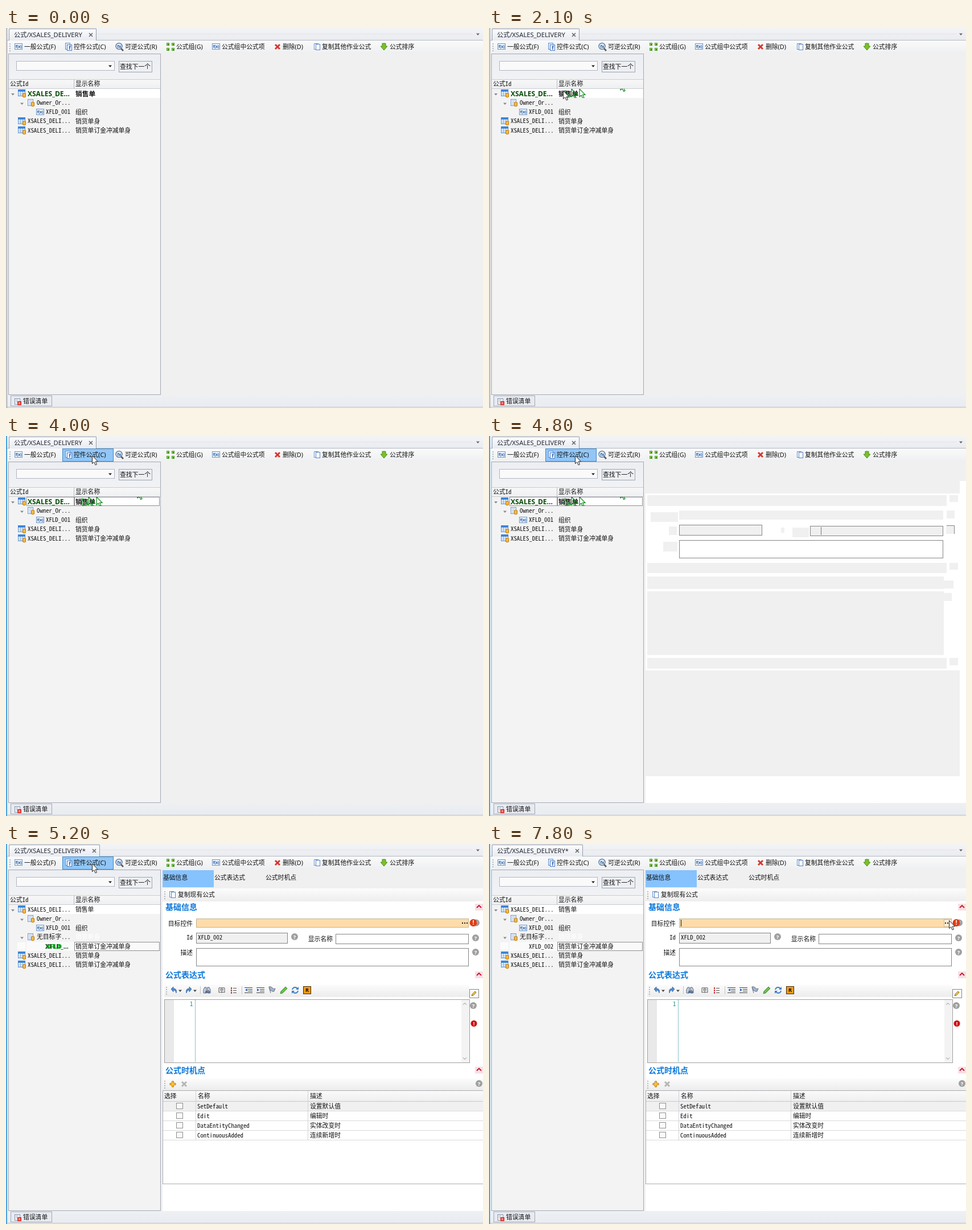
Recreate the animation shown at these times as an HTML page with a canvas. Size 838 px wide and 668 px high, loop 8000 ms.

```html
<!DOCTYPE html>
<html lang="zh-CN">
<head>
<meta charset="utf-8">
<title>公式</title>
<style>
html, body { margin: 0; width: 100%; height: 100%; overflow: hidden; background: #f0f0f0; }
canvas { display: block; }
</style>
</head>
<body>
<canvas id="stage" width="838" height="668"></canvas>
<script>
const ctx = document.getElementById('stage').getContext('2d');
const LOOP = 8000;
const SANS = '"Noto Sans", "Open Sans", "Noto Sans CJK SC", "Noto Sans CJK", sans-serif';
const MONO = '"Noto Sans Mono CJK SC", "Noto Sans Mono", "Noto Sans CJK SC", monospace';
const SIZE = 10.8;
const GRAY = '#f0f0f0', HEAD = '#0a78dc';

// Half-width letters should be half as wide as an ideograph.
ctx.font = `${SIZE}px ${MONO}`;
const MONO_SIZE = SIZE * (SIZE / 2) / ctx.measureText('X').width;

function rect(x, y, w, h, fill, stroke) {
  if (fill) { ctx.fillStyle = fill; ctx.fillRect(x, y, w, h); }
  if (stroke) { ctx.strokeStyle = stroke; ctx.lineWidth = 1; ctx.strokeRect(x + .5, y + .5, w - 1, h - 1); }
}
function fade(x, y, w, h, top, bottom) {
  const g = ctx.createLinearGradient(0, y, 0, y + h);
  g.addColorStop(0, top);
  g.addColorStop(1, bottom);
  rect(x, y, w, h, g);
}
function text(s, x, y, { color = '#111', size = SIZE, weight = 400, font = SANS, align = 'left' } = {}) {
  ctx.font = `${weight} ${size}px ${font}`;
  ctx.fillStyle = color;
  ctx.textAlign = align;
  ctx.textBaseline = 'alphabetic';
  ctx.fillText(s, x, Math.round(y + size * .37));
}
const mono = (s, x, y, o) => text(s, x, y, { font: MONO, size: MONO_SIZE, ...o });
function path(d, x, y, stroke, width = 1, fill) {
  const p = new Path2D(d);
  ctx.save();
  ctx.translate(x, y);
  if (fill) { ctx.fillStyle = fill; ctx.fill(p); }
  if (stroke) { ctx.strokeStyle = stroke; ctx.lineWidth = width; ctx.stroke(p); }
  ctx.restore();
}
function disc(x, y, r, fill, mark) {
  ctx.beginPath();
  ctx.arc(x, y, r, 0, 7);
  ctx.fillStyle = fill;
  ctx.fill();
  if (mark) text(mark, x, y, { color: '#fff', size: r * 1.6, weight: 700, align: 'center' });
}
const help = (x, y) => disc(x, y, 6, '#a0a0a0', '?');
const alarm = (x, y) => disc(x, y, 5.5, '#d01010', '!');
const down = (x, y, color = '#444') => path('M-3 -1.5H3L0 2Z', x, y, null, 1, color);
function grip(x, y, n) {
  for (let i = 0; i < n; i++) rect(x, y + i * 4, 2, 2, '#b4b8be');
}
function dotted(x, y, w, h) {
  ctx.setLineDash([1, 1]);
  rect(x, y, w, h, null, '#222');
  ctx.setLineDash([]);
}

const icons = {
  fx(x, y) {
    rect(x - 7, y - 6, 14, 11, '#eaf4ff', '#6d93c4');
    text('f(x)', x, y - .5, { size: 6.5, weight: 700, color: '#24508c', align: 'center' });
  },
  pages(x, y) {
    rect(x - 6, y - 7, 9, 12, '#e2efff', '#5f8fd0');
    rect(x - 3, y - 4, 9, 11, '#f8fbff', '#4c7cc2');
  },
  control(x, y) {
    icons.pages(x, y);
    text('f', x + 2, y + 1.5, { size: 9, weight: 700, color: '#2459a8', align: 'center' });
  },
  lens(x, y) {
    path('M3 3L7 7', x, y, '#555', 2.5);
    path('M5 -1A5.5 5.5 0 1 1 -6 -1A5.5 5.5 0 1 1 5 -1', x, y, '#6680a0', 1.5, '#dcecff');
    text('fx', x, y - 1, { size: 7, weight: 700, color: '#24508c', align: 'center' });
  },
  group(x, y) {
    for (const dx of [-7, 2]) for (const dy of [-7, 2]) {
      rect(x + dx, y + dy, 5, 5, '#a5d86c', '#4b9c25');
      rect(x + dx + 2, y + dy + 2, 2, 2, '#3d8a18');
    }
  },
  cross: (x, y) => path('M-4 -4L4 4M4 -4L-4 4', x, y, '#d5382f', 3),
  copy(x, y) {
    rect(x - 5, y - 6, 8, 11, '#f4f8ff', '#6a93cf');
    rect(x - 2, y - 5, 8, 11, '#fff', '#5b85c4');
  },
  sort: (x, y) => path('M-3 -6H3V-1H6L0 6L-6 -1H-3Z', x, y, '#4b8f16', 1, '#7ac02c'),
  drum(x, y) {
    path('M-2.5 -3Q0 -4.5 2.5 -3V3Q0 4.5 -2.5 3Z', x, y, '#b97812', 1, '#f7b93e');
  },
  table(x, y) {
    rect(x - 7, y - 7, 13, 12, '#f4f9ff', '#5b8fd0');
    rect(x - 7, y - 7, 13, 4, '#3d86d8');
    path('M-7 -.5H6M-7 2.5H6M-2.5 -3V5M1.5 -3V5', x, y, '#8db4e2');
    icons.drum(x + 4, y + 3);
  },
  field(x, y) {
    rect(x - 6, y - 7, 10, 12, '#f6faff', '#6f95c8');
    path('M-4 -4H2M-4 -1H1M-4 2H0', x, y, '#8aa9d4');
    icons.drum(x + 3, y + 2);
  }
};

const TOOLS = [
  ['fx', 22, 32, '一般公式(F)'], ['control', 110, 119, '控件公式(C)'], ['lens', 199, 209, '可逆公式(R)'],
  ['group', 289, 299, '公式组(G)'], ['fx', 369, 379, '公式组中公式项'], ['cross', 477, 486, '删除(D)'],
  ['copy', 546, 555, '复制其他作业公式'], ['sort', 664, 674, '公式排序']
];

function drawFrame(t) {
  const edited = t >= 4900, tabRight = edited ? 165 : 159;
  rect(0, 0, 838, 668, GRAY);
  fade(0, 0, 838, 22, '#f3f4f6', '#e9ebef');
  rect(160, 10, 660, 1, '#e2e4e8');
  rect(0, 21, 838, 1, '#b3b9c4');
  fade(5, 1, tabRight - 5, 21, '#fcfcfd', '#e8ebf1');
  path(`M5.5 22V1.5H${tabRight - .5}V22`, 0, 0, '#949cab');
  text('公式/XSALES_DELIVERY' + (edited ? '*' : ''), 14, 12, { size: 11.2, color: '#202530' });
  path('M-3 -3L3 3M3 -3L-3 3', tabRight - 10, 12, '#666', 1.6);
  down(829, 11, '#666');

  fade(3, 22, 835, 23, '#fafafa', '#eeeff1');
  grip(6, 27, 4);
  if (t >= 4000 && t < 6700) rect(99, 22, 90, 23, t >= 4700 && t < 4800 ? '#78b5ee' : '#91c6f7', '#3f87c8');
  for (const [icon, ix, tx, label] of TOOLS) {
    icons[icon](ix, 33);
    text(label, tx, 33.5);
  }

  rect(4, 45, 268, 600, '#f3f3f4', '#a4a9b3');
  fade(5, 46, 266, 44, '#eceef2', '#f1f2f4');
  rect(18, 58, 173, 17, '#fafafb', '#b1b6c0');
  down(183, 67, '#222');
  rect(198, 58, 59, 20, '#edeff3', '#9ba3b2');
  text('查找下一个', 200, 68.5);
  fade(5, 90, 266, 17, '#f8f8f9', '#eeeff1');
  rect(5, 90, 266, 1, '#c9ccd2');
  rect(5, 106, 266, 1, '#c9ccd2');
  rect(119, 90, 1, 17, '#b9bdc5');
  mono('公式Id', 7, 98);
  text('显示名称', 122, 98);

  fade(2, 645, 836, 23, '#eef0f3', '#e8ebef');
  rect(8, 646, 73, 19, '#e7eaf0', '#a1a8b5');
  rect(15, 651, 10, 11, '#fff', '#8390a5');
  path('M17 654H22M17 657H22', 0, 0, '#8390a5');
  rect(20, 656, 7, 7, '#d33');
  path('M22 658L25 661M25 658L22 661', 0, 0, '#fff');
  text('错误清单', 30, 656.5);
  rect(2, 666, 836, 1, '#bfc4cc');
  rect(0, 0, 2, 668, t >= 2400 ? '#4ba3df' : '#e7e8ea');
  if (t < 2400) rect(1, 0, 1, 668, '#8d9197');
}

function treeRow(y, depth, icon, id, name, open) {
  const x = 38 + depth * 16;
  if (open) down(x - 26, y + 1.5, '#888');
  if (icon) icons[icon](x - 10, Math.round(y));
  if (id) mono(id, x, y);
  if (name) text(name, 122, y + .5);
}

function drawTree(t) {
  rect(36, 107, 235, 16, '#fff');
  treeRow(131.5, 1, 'field', 'Owner_Or...', '', true);
  treeRow(147.5, 2, 'fx', 'XFLD_001', '组织');
  if (t < 4900) {
    treeRow(115, 0, 'table', '', '', true);
    text('XSALES_DE...', 38, 115.5, { weight: 700, size: 12, color: '#064d06' });
    text('销售单', 122, 115.5, { weight: 700, size: 11.7 });
    treeRow(163.5, 0, 'table', 'XSALES_DELI...', '销货单身');
    treeRow(180, 0, 'table', 'XSALES_DELI...', '销货单订金冲减单身');
    drawTrails(t);
    if (t >= 2400) {
      dotted(36, 107, 84, 16);
      dotted(120, 107, 150, 16);
    }
    return;
  }
  treeRow(115, 0, 'table', 'XSALES_DELI...', '销售单', true);
  text('销货单身', 122, 163.5, { color: '#fff' });
  treeRow(163.5, 1, 'field', '无目标字...', '', true);
  rect(20, 173, 14, 13, '#fbfbfb');
  rect(36, 172, 234, 16, '#fafafa');
  treeRow(180, 2, '', t >= 7800 ? 'XFLD_002' : '', '销货单订金冲减单身');
  if (t < 7800) {
    text('XFLD_...', 69, 180.5, { weight: 700, color: '#0a3a0a' });
    text('XFLD', 71, 180.5, { weight: 700, color: '#00b818' });
  }
  dotted(120, 172, 150, 16);
  treeRow(196, 0, 'table', 'XSALES_DELI...', '销货单身');
  treeRow(212, 0, 'table', 'XSALES_DELI...', '销货单订金冲减单身');
}

const ARROW = 'M0 0V14L3.2 11.2L5.6 16.5L8 15.4L5.6 10.4H10Z';
// Time, x, y of the pointer tip.
const ROUTE = [
  [1000, 800, 22], [1300, 433, 66], [1500, 231, 95], [1600, 192, 104], [1700, 160, 107], [1800, 144, 107],
  [2200, 125, 111], [3700, 125, 111], [3800, 131, 94], [3900, 145, 52], [4000, 151, 34], [6500, 151, 34],
  [6700, 240, 46], [7000, 520, 88], [7200, 712, 118], [7300, 780, 131], [7400, 808, 134]
];
function pointerAt(t) {
  const now = Math.floor(t / 100) * 100;
  const next = ROUTE.findIndex(k => k[0] > now);
  if (next < 0) return ROUTE[ROUTE.length - 1].slice(1);
  const [t0, x0, y0] = ROUTE[next - 1], [t1, x1, y1] = ROUTE[next];
  const k = (now - t0) / (t1 - t0);
  return [x0 + (x1 - x0) * k, y0 + (y1 - y0) * k];
}
function drawTrails(t) {
  ctx.save();
  ctx.beginPath();
  ctx.rect(121, 107, 149, 16);
  ctx.clip();
  for (const [when, x, y] of [[1600, 231, 95], [1800, 159, 107], [1900, 145, 107], [2100, 134, 110]])
    if (t >= when) path(ARROW, x, y, '#078a16', 1.2, x > 150 ? '#fff' : null);
  ctx.restore();
}

// Blocks shown while the form is being built: x, y, width, height.
const BLOCKS = [
  [278, 104, 526, 19], [809, 104, 15, 12], [278, 223, 526, 18], [809, 223, 15, 12],
  [278, 247, 521, 22], [799, 254, 17, 14], [278, 273, 521, 112], [799, 276, 14, 14],
  [278, 390, 526, 19], [809, 390, 15, 13], [275, 412, 552, 186], [316, 159, 14, 15],
  [513, 161, 6, 9], [803, 157, 15, 15]
];
function drawWaiting() {
  rect(284, 134, 48, 17, GRAY);
  rect(334, 131, 464, 16, GRAY);
  rect(804, 131, 14, 14, GRAY);
  rect(533, 161, 29, 17, GRAY);
  rect(306, 186, 25, 17, GRAY);
}
function drawSkeleton(t) {
  for (const b of BLOCKS) rect(...b, GRAY);
  drawWaiting();
  if (t < 4800) return;
  rect(334, 156, 146, 19, GRAY, '#858585');
  rect(564, 158, 234, 18, GRAY, '#858585');
  rect(583, 160, 1, 14, '#777');
  path('M804 157.5H817.5V172', 0, 0, '#858585');
  rect(334, 183, 464, 32, '#fff', '#858585');
}

function section(label, y) {
  text(label, 280, y, { size: 14, weight: 700, color: HEAD });
  rect(824, y - 6, 14, 12, '#f8dfe2');
  path('M-4 2L0 -2L4 2', 831, y - 1, '#c8102e', 1.8);
}

function drawEditorBar() {
  fade(278, 247, 536, 22, '#fcfcfc', '#ececec');
  grip(281, 251, 4);
  path('M-5 -2L-1 -6V-3Q6 -3 4 5Q3 0 -1 0V3Z', 295, 257, '#3568a5', .8, '#4d8bd4');
  path('M5 -2L1 -6V-3Q-6 -3 -4 5Q-3 0 1 0V3Z', 321, 257, '#3568a5', .8, '#4d8bd4');
  down(306, 258); down(332, 258);
  rect(341, 250, 1, 14, '#c4c4c4');
  path('M-6 5V-1L-4 -5H-1V5ZM1 5V-5H4L6 -1V5Z', 353, 257, '#58667a', 1, '#c6d0df');
  text('ab', 354, 259, { size: 7, weight: 700, align: 'center', color: '#244a80' });
  path('M0 -4Q-3 -5 -5 -4V4Q-3 3 0 4Q3 3 5 4V-4Q3 -5 0 -4V4M-3 -2H-1M-3 0H-1M1 -2H3M1 0H3', 379, 257, '#555');
  for (let i = 0; i < 3; i++) {
    rect(395, 252 + i * 4, 2, 3, '#c33');
    rect(399, 253 + i * 4, 6, 1, '#555');
  }
  rect(414, 250, 1, 14, '#c4c4c4');
  for (const [x, dir] of [[426, -1], [447, 1]]) {
    path('M-7 -5H7M-1 -2H7M-1 1H7M-7 4H7', x, 257.5, '#444');
    path(`M${-4 - 2 * dir} -3L${-4 + 2 * dir} -.5L${-4 - 2 * dir} 2Z`, x, 257, null, 1, '#2868c0');
  }
  path('M-5 -6L-2 5M-5 -6Q-1 -7 1 -4T6 -3L4 2Q1 3 -1 1T-3 1Z', 467, 257, '#66748a', 1, '#a3b3c9');
  path('M-6 6L-5 2L3 -6L6 -3L-2 5Z', 488, 257, '#3c8f2d', 1, '#6bc04e');
  path('M-5 -1Q-4 -5 0 -5Q3 -5 4 -2M5 1Q4 5 0 5Q-3 5 -4 2', 508, 257, '#3b7fc9', 2);
  path('M6 -6V-1H1ZM-6 6V1H-1Z', 508, 257, null, 1, '#3b7fc9');
  rect(522, 250, 14, 14, '#f59a16', '#3b2a08');
  text('R', 529, 257, { size: 9, weight: 700, align: 'center' });
}

function drawEditor(t) {
  section('公式表达式', 230);
  drawEditorBar();
  rect(278, 273, 537, 112, '#fff', '#a0a0a0');
  rect(279, 274, 16, 110, '#e9e9e9');
  mono('1', 323, 281, { color: '#168c8c' });
  ctx.setLineDash([1, 1]);
  path('M332.5 274V384', 0, 0, '#168c8c');
  ctx.setLineDash([]);
  rect(800, 274, 14, 110, '#f3f3f3');
  path('M-3 1.5L0 -1.5L3 1.5', 806, 281, '#888');
  path('M-3 -1.5L0 1.5L3 -1.5', 806, 377, '#888');
  rect(814, 255, 17, 16, '#fafafa', '#888');
  path('M-4 4L-3 1L2 -4L4 -2L-1 3Z', 822, 263, '#8a6a18', 1, '#f2c84b');
  help(821, 284);
  const hidden = [[5400, 5700], [5900, 6100], [6300, 6600]].some(([a, b]) => t >= a && t < b);
  if (!hidden) alarm(822, 315.5);
}

function drawTriggers() {
  section('公式时机点', 397.5);
  fade(275, 412, 563, 21, '#fcfcfc', '#ececec');
  grip(278, 416, 4);
  path('M-1.5 -5H1.5V-1.5H5V1.5H1.5V5H-1.5V1.5H-5V-1.5H-1.5Z', 293, 422, '#b97a10', 1, '#ffc83d');
  path('M-4 -4L4 4M4 -4L-4 4', 313, 422, '#b5b5b5', 3);
  help(831, 421);
  rect(275, 433, 570, 165, '#fff', '#a7abb2');
  fade(276, 434, 562, 18, '#fafafa', '#eeeff0');
  rect(276, 452, 562, 17, '#f0f0f1');
  for (const [label, x] of [['选择', 278], ['名称', 337], ['描述', 534]]) text(label, x, 443);
  const rows = [['SetDefault', '设置默认值'], ['Edit', '编辑时'], ['DataEntityChanged', '实体改变时'], ['ContinuousAdded', '连续新增时']];
  rect(276, 452, 562, 1, '#c6c9ce');
  rows.forEach(([name, note], i) => {
    const y = 461 + i * 17;
    rect(276, y + 8, 562, 1, '#dadada');
    rect(299, y - 6, 12, 11, '#fafafa', '#8e8e8e');
    mono(name, 336, y);
    text(note, 534, y + .5);
  });
  rect(333, 434, 1, 87, '#d0d2d6');
  rect(530, 434, 1, 87, '#d0d2d6');
}

function drawBasics(t) {
  section('基础信息', 111);
  rect(334, 156, 161, 19, GRAY, '#858585');
  mono('XFLD_002', 337, 164);
  help(507, 163);
  rect(579, 158, 234, 18, '#fff', '#858585');
  rect(334, 183, 479, 32, '#fff', '#858585');
  if (t < 5000) {
    drawWaiting();
    rect(316, 159, 14, 15, GRAY);
    rect(804, 131, 8, 14, GRAY);
    path('M564.5 161V175.5H577M583.5 160V174M797.5 159V175', 0, 0, '#858585');
    return;
  }
  rect(275, 46, 563, 31, GRAY);
  rect(275, 46, 90, 30, '#86c2fd');
  for (const [label, x] of [['基础信息', 276], ['公式表达式', 366], ['公式时机点', 456]]) text(label, x, 59.5);
  fade(275, 78, 563, 22, '#fcfcfc', '#eeeeee');
  grip(278, 83, 4);
  icons.copy(292, 89);
  text('复制现有公式', 302, 89.5);
  text('目标控件', 328, 140, { align: 'right' });
  mono('Id', 328, 164, { align: 'right' });
  text('显示名称', 574, 167, { align: 'right' });
  text('描述', 328, 191.5, { align: 'right' });
  help(825, 165);
  help(825, 190);
  help(826, 138.5);
  rect(334, 131, 479, 16, t < 5100 ? GRAY : '#fedcaa', '#c5b28f');
  if (t < 5100) return;
  if (t >= 7500) rect(799, 132, 14, 14, '#fdeed7', '#d3b98c');
  for (const x of [801, 805, 809]) rect(x, 138, 2, 2, '#222');
  if (t >= 7800) rect(337, 133, 1, 12, '#111');
  if (t >= 5200) disc(821, 138.5, 6.5, '#df3d16', '!');
}

function drawForm(t) {
  rect(275, 46, 563, 599, '#fff');
  rect(272, 46, 566, 33, GRAY);
  rect(272, 79, 555, 22, GRAY);
  if (t < 4900) return drawSkeleton(t);
  drawBasics(t);
  drawEditor(t);
  drawTriggers();
}

function drawTooltip() {
  rect(127, 133, 43, 24, 'rgba(0,0,0,.25)');
  rect(125, 131, 43, 24, '#f8f8f8', '#777');
  text('销售单', 130, 143.5);
}

function render(t) {
  drawFrame(t);
  drawTree(t);
  if (t >= 4700) drawForm(t);
  if (t >= 3000 && t < 3800) drawTooltip();
  if (t >= 1000) {
    const [x, y] = pointerAt(t);
    path(ARROW, Math.round(x) + .5, Math.round(y) + .5, '#222', 1, '#fff');
  }
}

const start = performance.now();
function tick() {
  render((performance.now() - start) % LOOP);
  requestAnimationFrame(tick);
}
tick();
</script>
</body>
</html>
```
